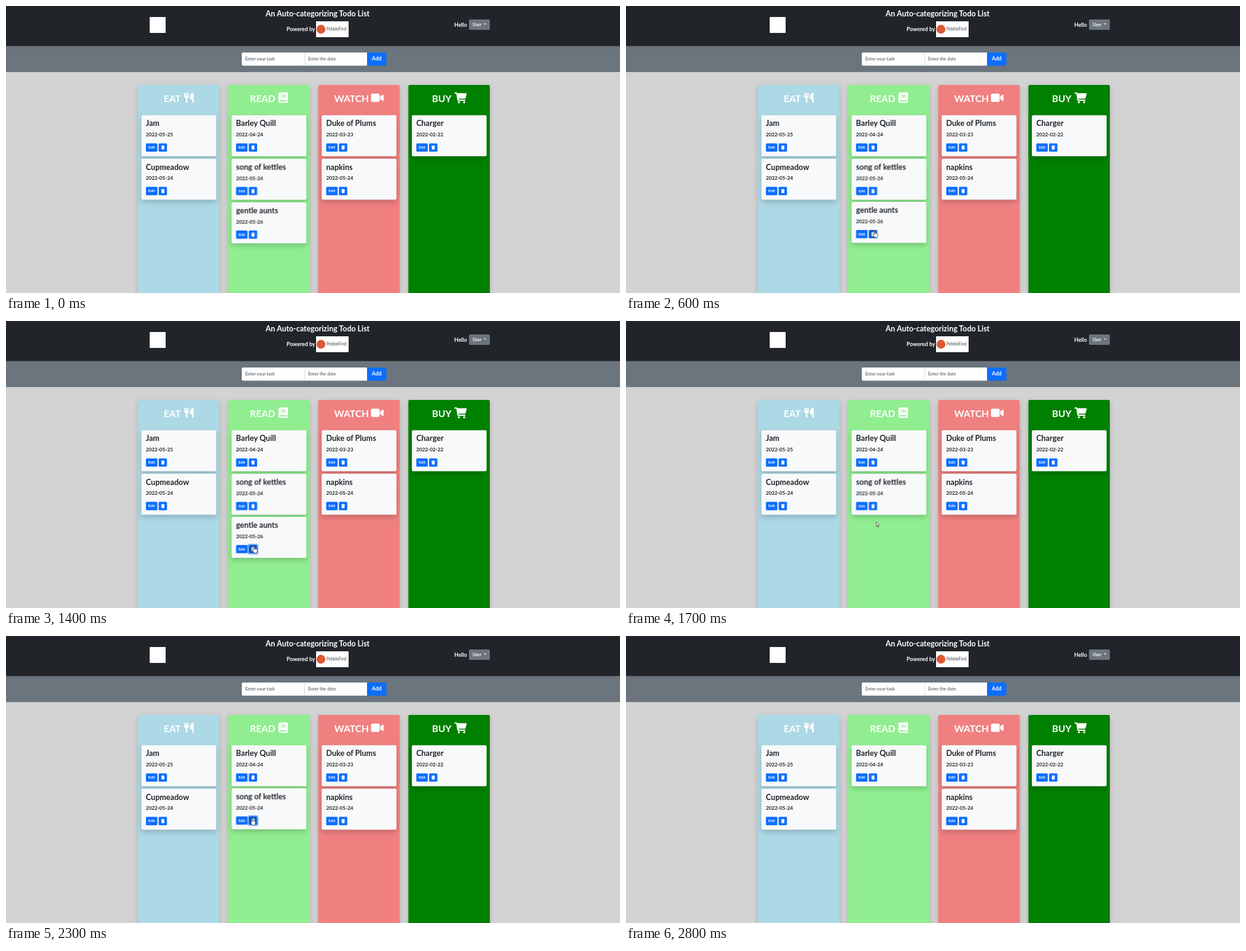
Write an HTML page that moves like this. It is 1000 by 469 pixels and loops after 3300 ms.

```html
<!DOCTYPE html>
<html lang="en">
<head>
<meta charset="utf-8">
<title>Todo list</title>
<style>
html, body { margin: 0; width: 100%; height: 100%; overflow: hidden; background: #d3d3d3; }
svg { display: block; width: 100%; height: 100%; }
text { font-family: Lato, "Open Sans", sans-serif; font-weight: 700; fill: #fff; }
.column { filter: drop-shadow(0 3px 4px rgba(0, 0, 0, .17)); }
.panel { fill: #f8f9fa; filter: drop-shadow(0 4px 4px rgba(0, 0, 0, .18)); }
.ink { fill: #212529; }
.button { fill: #0d6efd; }
.ring { fill: none; stroke: #86b6fe; stroke-width: 2; opacity: 0; }
.hint { fill: #6c757d; font-size: 7.2px; }

.cursor, .hand, .arrow, .first, .second,
.first .trash, .first .ring, .second .trash, .second .ring {
  animation: 3300ms step-end infinite;
}
.cursor { animation-name: move; }
.hand { animation-name: hand; }
.arrow { animation-name: arrow; }
.first { animation-name: first-card; }
.first .trash { animation-name: first-hover; }
.first .ring { animation-name: first-ring; }
.second { animation-name: second-card; }
.second .trash { animation-name: second-hover; }
.second .ring { animation-name: second-ring; }

@keyframes move {
  0% { transform: translate(520px, 480px); }
  3.03% { transform: translate(478px, 452px); }
  6.06% { transform: translate(446px, 424px); }
  9.09% { transform: translate(422px, 398px); }
  12.12% { transform: translate(409px, 380px); }
  15.15% { transform: translate(405px, 367px); }
  27.27% { transform: translate(405px, 368px); }
  42.42% { transform: translate(404px, 368px); }
  48.48% { transform: translate(407px, 350px); }
  51.51% { transform: translate(407.5px, 328.5px); }
  54.54% { transform: translate(404px, 305px); }
  57.57% { transform: translate(401px, 298px); }
  75.75% { transform: translate(412px, 325px); }
  78.78% { transform: translate(440px, 375px); }
  81.81% { transform: translate(480px, 435px); }
  84.84%, 100% { transform: translate(520px, 480px); }
}
@keyframes hand {
  0%, 48.48%, 75.75%, 100% { opacity: 0; }
  15.15%, 54.54% { opacity: 1; }
}
@keyframes arrow {
  0%, 48.48%, 75.75%, 100% { opacity: 1; }
  15.15%, 54.54% { opacity: 0; }
}
@keyframes first-card {
  0% { transform: none; opacity: 1; }
  12.12% { transform: translateY(-.8px); opacity: 1; }
  48.48%, 100% { transform: none; opacity: 0; }
}
@keyframes first-hover {
  0%, 100% { fill: #0d6efd; }
  15.15% { fill: #0b5ed7; }
  42.42% { fill: #0a58ca; }
}
@keyframes first-ring {
  0%, 48.48%, 100% { opacity: 0; }
  42.42% { opacity: 1; }
}
@keyframes second-card {
  0% { transform: none; opacity: 1; }
  54.54% { transform: translateY(-.8px); opacity: 1; }
  75.75%, 100% { transform: none; opacity: 0; }
}
@keyframes second-hover {
  0%, 100% { fill: #0d6efd; }
  54.54% { fill: #0b5ed7; }
  69.69% { fill: #0a58ca; }
}
@keyframes second-ring {
  0%, 75.75%, 100% { opacity: 0; }
  69.69% { opacity: 1; }
}
</style>
</head>
<body>
<svg viewBox="0 0 1000 469" preserveAspectRatio="none">
  <rect width="1000" height="469" fill="#d3d3d3"/>
  <rect width="1000" height="108" fill="#6c757d"/>
  <rect width="1000" height="65.5" fill="#212529"/>

  <rect x="234" y="18" width="26" height="26" fill="#fff"/>
  <text x="507.5" y="17.3" font-size="12.4" text-anchor="middle">An Auto-categorizing Todo List</text>
  <text x="457" y="40.7" font-size="8.8">Powered by</text>
  <rect x="505" y="25" width="53" height="26" fill="#fff"/>
  <circle cx="513" cy="38" r="7.2" fill="#de5833"/>
  <text x="522" y="40" font-size="6.6" style="font-weight:400;fill:#444">PebbleFind</text>
  <text x="730" y="34.4" font-size="8.8">Hello</text>
  <rect x="754" y="22" width="34" height="17" rx="2" fill="#6c757d"/>
  <text x="760" y="32.6" font-size="6.9">User</text>
  <path d="M778.3 28.6h4l-2 2.1z" fill="#fff"/>

  <path d="M588 76H386q-2 0-2 2v17.5q0 2 2 2h202z" fill="#fff"/>
  <path d="M486.5 76v21.5" stroke="#ced4da" stroke-width=".8"/>
  <text class="hint" x="389.7" y="88.9">Enter your task</text>
  <text class="hint" x="492" y="88.9">Enter the date</text>
  <path class="button" d="M588 76h29.5q2 0 2 2v17.5q0 2-2 2H588z"/>
  <text x="603.7" y="89.2" font-size="8.7" text-anchor="middle">Add</text>

  <g id="board"></g>

  <g class="cursor" stroke="#222" stroke-width=".7" stroke-linejoin="round">
    <path class="arrow" fill="#fff" d="M0 0v7.2l1.7-1.6 1.1 2.6 1.1-.5-1.1-2.5h2.3z"/>
    <path class="hand" fill="#fff" d="M-.8.8q.8-1.6 1.6 0v3.4l4 .9q.8.3.6 1.2l-.7 3.2-.8 1.7H.3L-2.8 7q-.3-1.2.9-1l1.1.8z"/>
  </g>
</svg>
<script>
const icons = {
  fork: `<path d="M.2.5h1.4v5h.8v-5h1.3v5h.8v-5h1.4v5h.8v-5h1.2v6q0 2.2-2.4 3v6.4q0 1-1.3 1t-1.3-1V9.5Q.2 8.7.2 6.5z"/>
    <path d="M15.7 1.2v14.7q0 1-1.2 1t-1.2-1v-5H9.8V7q.4-5 4.7-6.5 1.2-.2 1.2.7z"/>`,
  book: `<path fill-rule="evenodd" d="M3 0h11.5q1 0 1 1v10.5q0 .8-.8 1v2.2q.8.2.8 1.2t-1 1.1H3q-3 0-3-3V3q0-3 3-3zM4.5 4v1.2H12V4zm0 2.4v1.2H12V6.4zM3 12.7q-1 0-1 1t1 1h9.8v-2z"/>`,
  video: `<rect y="2" width="14" height="13.5" rx="2"/><path d="M15 6.5l4-2.7q1.5-.6 1.5.8v8.3q0 1.4-1.5.8l-4-2.7z"/>`,
  cart: `<path d="M0 1q0-1 1-1h2.5q.9 0 1.2 1.2H19q1.3 0 1 1.3L18.200 9q-.4 1.2-1.6 1.2H6.5l.3 1.600H17q.9 0 .9.900t-.9.900H6q-.9 0-1.1-.9L3 2H1Q0 2 0 1z"/>
    <circle cx="7.3" cy="16" r="1.7"/><circle cx="16" cy="16" r="1.7"/>`
};

const columns = [
  { title: "EAT", color: "#add8e6", textX: 42, icon: "fork", iconX: 75,
    cards: [["Jam", "2022-05-25"], ["Cupmeadow", "2022-05-24"]] },
  { title: "READ", color: "#90ee90", textX: 35.5, icon: "book", iconX: 82,
    cards: [["Barley Quill", "2022-04-24"], ["song of kettles", "2022-05-24", "second"], ["gentle aunts", "2022-05-26", "first"]] },
  { title: "WATCH", color: "#f08080", textX: 26, icon: "video", iconX: 86,
    cards: [["Duke of Plums", "2022-03-23"], ["napkins", "2022-05-24"]] },
  { title: "BUY", color: "#008000", textX: 38.5, icon: "cart", iconX: 75,
    cards: [["Charger", "2022-02-22"]] }
];

const drawCard = ([name, date, role = ""], row) => `
  <g transform="translate(5.7 ${49.4 + row * 71.2})"><g class="${role}">
    <rect class="panel" width="121.7" height="67" rx="2"/>
    <text class="ink" x="7.2" y="18.1" font-size="12.6">${name}</text>
    <text class="ink" x="7.2" y="34.7" font-size="8.2">${date}</text>
    <rect class="ring" x="27" y="45" width="15.6" height="15.6" rx="2.2"/>
    <rect class="button" x="7.3" y="46" width="18.6" height="13.6" rx="1.5"/>
    <rect class="button trash" x="28" y="46" width="13.6" height="13.6" rx="1.5"/>
    <text x="16.6" y="54.8" font-size="6.2" text-anchor="middle">Edit</text>
    <path fill="#fff" d="M32 50h1.6l.5-.7h1.6l.5.7h1.6v.8H32zM32.4 51.2h5l-.3 4.5q0 .5-.5.5h-3.4q-.5 0-.5-.5z"/>
  </g></g>`;

const drawColumn = (column, index) => `
  <g transform="translate(${214.9 + index * 146.8} 129)">
    <rect class="column" width="132.7" height="345" rx="2" fill="${column.color}"/>
    <text x="${column.textX}" y="28" font-size="15.5">${column.title}</text>
    <g transform="translate(${column.iconX} 12.3)" fill="#fff">${icons[column.icon]}</g>
    ${column.cards.map(drawCard).join("")}
  </g>`;

document.getElementById("board").innerHTML = columns.map(drawColumn).join("");
</script>
</body>
</html>
```
